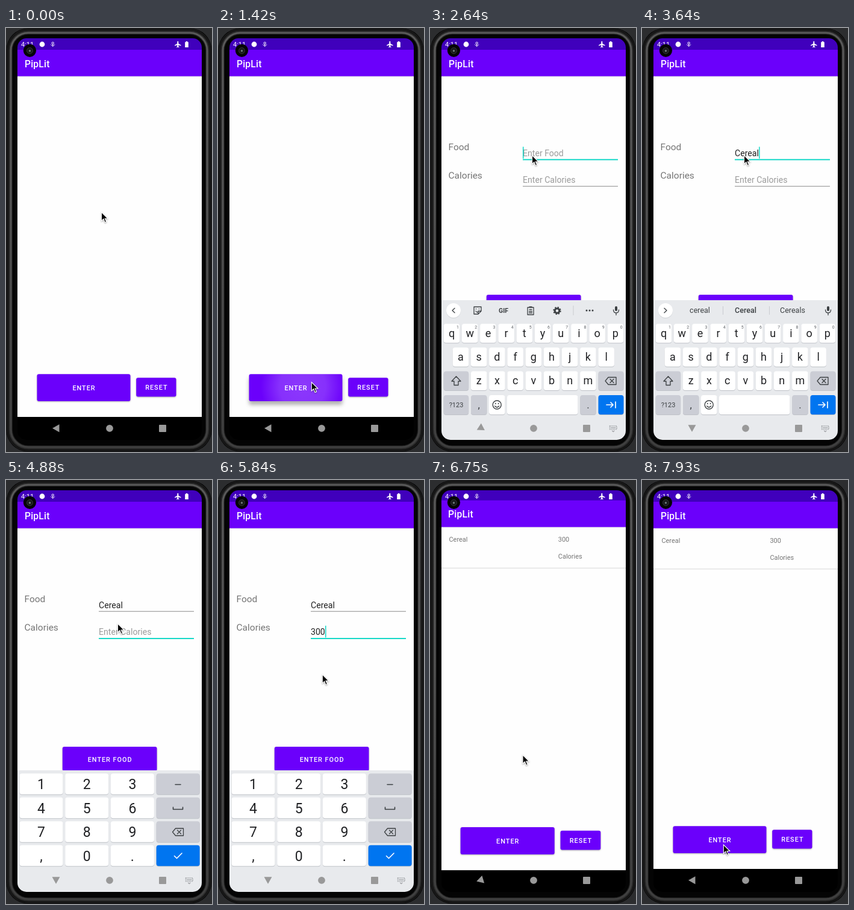
Animation, 342 px wide and 701 px high, one loop 7.99 s. Source, as an HTML page:

```html
<!DOCTYPE html>
<html lang="en">
<head>
<meta charset="utf-8">
<title>Food log demo</title>
<style>
html, body { margin: 0; width: 100%; height: 100%; overflow: hidden; background: #2c2d2f; }
svg { display: block; width: 342px; height: 701px; font-family: Roboto, sans-serif; }
.med { font-weight: 500; }
.btn { filter: drop-shadow(0 1px 1px rgba(0,0,0,.3)); }
</style>
</head>
<body>
<svg id="stage" viewBox="0 0 342 701" xmlns="http://www.w3.org/2000/svg"></svg>
<script>
const LOOP = 7990;
const PURPLE = '#6b00fb', DARK = '#4000bc', TEAL = '#00d5c3', GREY = '#757575', INK = '#3c4043';
const OPEN = 1540, CLOSE = 6550, WINDOW_MS = 400;

const rect = (x, y, w, h, fill, rx = 0, more = '') =>
  `<rect x="${x}" y="${y}" width="${w}" height="${h}" rx="${rx}" fill="${fill}" ${more}/>`;
const text = (x, y, size, fill, str, more = '') =>
  `<text x="${x}" y="${y}" font-size="${size}" fill="${fill}" ${more}>${str}</text>`;
const mid = (x, y, size, fill, str, more = '') =>
  text(x, y, size, fill, str, 'text-anchor="middle" ' + more);
const line = (d, color = INK, width = 1.3) =>
  `<path d="${d}" fill="none" stroke="${color}" stroke-width="${width}" stroke-linecap="round" stroke-linejoin="round"/>`;
const shape = (d, fill) => `<path d="${d}" fill="${fill}"/>`;
const dot = (x, y, r, fill, more = '') => `<circle cx="${x}" cy="${y}" r="${r}" fill="${fill}" ${more}/>`;

function button(id, x, y, w, h, label, baseline) {
  return `<g class="btn" id="${id}">${rect(x, y, w, h, PURPLE, 3)}</g>
    <clipPath id="${id}Clip">${rect(x, y, w, h, '#000', 3)}</clipPath>
    <g clip-path="url(#${id}Clip)">${dot(0, 0, 0, 'url(#ripple)', `id="${id}Wave"`)}</g>
    ${mid(x + w / 2 + .5, baseline, 10.9, '#fff', label, 'class="med" letter-spacing=".97"')}`;
}

function windowBase() {
  return rect(19, 17, 306, 664, '#000') + rect(19, 36, 306, 607, '#fefefe') +
    rect(19, 79, 306, 2, '#e9e6ee') + rect(19, 17, 306, 20, DARK) + rect(19, 36, 306, 43.7, PURPLE) +
    text(31, 64.5, 15.6, '#fff', 'PipLit', 'class="med" letter-spacing=".2"');
}

function mainWindow() {
  return windowBase() + `<g id="entry">
    ${text(32.5, 104, 10.9, GREY, 'Cereal')}${text(212.5, 104, 10.9, GREY, '300')}
    ${text(212.5, 131.5, 10.9, GREY, 'Calories')}${rect(19, 146.5, 306, 1.2, '#dfdfdf')}</g>` +
    button('enter', 51.5, 572.3, 155, 44.7, 'ENTER', 599) +
    button('reset', 216.2, 578.2, 66.3, 31.3, 'RESET', 598.3);
}

function field(id, y) {
  return text(154, y, 14.1, '#9b9b9b', '', `id="${id}"`) +
    rect(154, y + 5, 158, 1, '#8b8b8b', 0, `id="${id}Line"`) +
    rect(154, y - 15.3, 1.4, 19.5, TEAL, 0, `id="${id}Caret"`);
}

function formWindow() {
  return windowBase() + text(30.5, 202.3, 15.5, GREY, 'Food') + text(30.5, 248.8, 15.5, GREY, 'Calories') +
    field('food', 211.7) + field('cal', 256.2) +
    button('save', 93.8, 441, 156.7, 40, 'ENTER FOOD', 465.5);
}

const key = (x, y, w, h, fill = '#fff') =>
  rect(x, y + 1, w, h, '#bfc2c8', 4) + rect(x, y, w, h, fill, 4);
const erase = (x, y) =>
  line(`M${x - 9} ${y}l5-6h13v12h-13zM${x - 1} ${y - 3}l6 6m0-6l-6 6`);

function letterKeys() {
  const grey = '#cbcdd5';
  let out = rect(19, 450, 306, 231, '#e8eaed');
  const row = (chars, x0, y, base, digits) => [...chars].forEach((c, i) => {
    const x = x0 + 30.2 * i;
    out += key(x - 13.3, y, 26.6, 31.5) + mid(x, base, 18, '#202124', c);
    if (digits) out += mid(x + 10, 497.3, 7, '#5f6368', (i + 1) % 10);
  });
  row('qwertyuiop', 36, 489, 510.5, true);
  row('asdfghjkl', 51, 528.3, 549.5);
  row('zxcvbnm', 81.2, 567.6, 588.7);
  out += key(22.7, 567.6, 41.5, 31.5, grey) + line('M43.5 576l-7.5 8h4v6.5h7v-6.5h4z') +
    key(279.5, 567.6, 42, 31.5, grey) + erase(300, 583.5) +
    key(22.7, 607, 41.5, 32, grey) + mid(43.5, 627, 11, INK, '?123') +
    key(68, 607, 26.5, 32, grey) + mid(81.2, 629, 17, INK, ',') +
    key(98, 607, 26.5, 32) + dot(111.2, 623, 7, 'none', `stroke="${INK}" stroke-width="1.4"`) +
    dot(108.8, 621, 1, INK) + dot(113.6, 621, 1, INK) + line('M107.7 625q3.5 4 7 0') +
    key(128, 607, 117.5, 32) +
    key(249.3, 607, 26.5, 32, grey) + mid(262.5, 629, 17, INK, '.') +
    key(279.5, 607, 42, 32, '#0075f0') + line('M293 623h11m-4-4l4 4l-4 4M308 618v10', '#fff', 1.7);
  out += dot(39, 468, 12, '#cfd2d6') + dot(39, 467, 12, '#fff') +
    `<g id="fold">${line('M41 463.2l-4 3.8l4 3.8')}</g>`;
  out += `<g id="tools">
    ${line('M73 461h12v7l-5 5h-7zM80 473v-5h5M76 468q2 3 4 1')}${dot(76.5, 464.5, .8, INK)}${dot(81.5, 464.5, .8, INK)}
    ${mid(122, 471, 10.5, INK, 'GIF', 'font-weight="700"')}
    ${line('M162 462h10v12h-10zM165 465.5h4M164.5 468.5h5M164.5 471h5M165 461h4')}
    ${dot(211, 467.5, 3.8, 'none', `stroke="${INK}" stroke-width="3"`)}
    ${dot(211, 467.5, 5.8, 'none', `stroke="${INK}" stroke-width="1.8" stroke-dasharray="2.3 2.255"`)}
    ${rect(237.5, 459, 1, 16, '#c9cbd0')}
    ${[260, 265, 270].map(x => dot(x, 467, 1.5, INK)).join('')}</g>
    <g id="hints">${[96, 172, 250].map((x, i) =>
      mid(x, 471, 12.5, INK, '', i === 1 ? 'class="med"' : '')).join('')}
    ${rect(134, 460, 1, 14, '#c9cbd0')}${rect(211, 460, 1, 14, '#c9cbd0')}</g>`;
  return out + rect(307, 460, 4, 8, INK, 2) + line('M304.5 466q0 5 4.5 5t4.5-5M309 471v3.5');
}

function numberKeys() {
  let out = rect(19, 480, 306, 201, '#e8eaed');
  const labels = ['1', '2', '3', '4', '5', '6', '7', '8', '9', ',', '0', '.'];
  for (let r = 0; r < 4; r++) {
    const y = 485.3 + 39.5 * r;
    for (let c = 0; c < 3; c++) {
      const x = 22.5 + 75.7 * c;
      out += key(x, y, 72, 34.5) + mid(x + 36, y + 26, 23, '#202124', labels[r * 3 + c]);
    }
    out += key(249.6, y, 72, 34.5, r < 3 ? '#cbcdd5' : '#0075f0');
  }
  return out + line('M281 503.5h9', INK, 1.5) + line('M277.5 541v3.5h16v-3.5', INK, 1.6) +
    erase(285.5, 582) + line('M279.5 621.5l4 4l8.5-8.5', '#fff', 1.6);
}

// Dark body with a soft metal band between its rim and the glass.
function phone() {
  const ring = (i, color, width) =>
    rect(i, i, 342 - 2 * i, 701 - 2 * i, 'none', 37 - i, `stroke="${color}" stroke-width="${width}"`);
  return rect(0, 0, 342, 701, '#2c2d2f') + rect(.5, .5, 341, 700, '#040404', 36) +
    ring(2, '#1d1d1d', 1.5) + ring(7, '#191919', 8) + ring(7.5, '#303030', 5) + ring(8, 'url(#metal)', 2.5);
}

const statusIcons = () =>
  text(25, 31, 10.9, '#fff', '4:11') + dot(60, 27, 4.4, '#fff') +
  dot(77.7, 25, 1.7, 'none', 'stroke="#fff"') + line('M74.7 27.5l3 3l3-3M77.7 26.5v3', '#fff', 1) +
  shape('M284.3 22.5q1-1.5 2 0v3.2l4.2 2.6v1.2l-4.2-1.3v2.3l1.2 1v.8l-2.2-.6l-2.2.6v-.8l1.2-1v-2.3l-4.2 1.3v-1.2l4.2-2.6z', '#fff') +
  shape('M297.2 23.3h1.5v-1.2h2.6v1.2h1.5v8.7h-5.6z', '#fff');

const navIcons = () =>
  `<g id="back">${shape('M-6 0L5.5-6.5V6.5z', '#999')}</g>` + dot(172, 661.8, 5.9, '#999') +
  rect(254, 656, 12, 12, '#999', 1) +
  `<g id="kbIcon">${rect(298.5, 658, 11.5, 5.5, 'none', 0, 'stroke="#a0a2a6" stroke-width="1.5" stroke-dasharray="1.5 1"')}
   ${line('M300.5 660.8h7.5M302.5 666l1.7 1.5l1.7-1.5', '#a0a2a6', 1.2)}</g>`;

const stage = document.getElementById('stage');
stage.innerHTML = `<defs>
  <clipPath id="screen">${rect(19, 17, 306, 664, '#000', 15)}</clipPath>
  <radialGradient id="ripple"><stop offset="0" stop-color="#fff" stop-opacity=".22"/>
    <stop offset=".55" stop-color="#fff" stop-opacity=".19"/><stop offset="1" stop-color="#fff" stop-opacity="0"/></radialGradient>
  <linearGradient id="metal" x2="0" y2="1"><stop stop-color="#5c5c5c"/><stop offset=".4" stop-color="#585858"/>
    <stop offset="1" stop-color="#404040"/></linearGradient></defs>
  ${phone()}
  <g clip-path="url(#screen)"><g id="main">${mainWindow()}</g><g id="form">${formWindow()}</g>
    <g id="board"><g id="letters">${letterKeys()}</g><g id="numbers">${numberKeys()}</g></g>
    ${navIcons()}${statusIcons()}</g>
  ${dot(39.5, 37.3, 10.6, '#050505')}${dot(39.5, 37.5, 5, '#181a1b', 'stroke="#333537"')}${dot(39.5, 37.7, 1.7, '#6e777c')}
  <g id="pointer"><path d="M0 0V14.5L3.4 11.3L5.8 17L8.2 16L5.8 10.5H10.5Z" fill="#000" stroke="#fff" stroke-width="1.1"
    style="filter:drop-shadow(0 1px 1px rgba(0,0,0,.35))"/></g>`;

const $ = {};
stage.querySelectorAll('[id]').forEach(node => { $[node.id] = node; });
const hints = [...$.hints.querySelectorAll('text')];

const clamp = v => Math.max(0, Math.min(1, v));
const span = (t, from, to) => clamp((t - from) / (to - from));
const smooth = v => v * v * (3 - 2 * v);
const lerp = (a, b, v) => a + (b - a) * v;
const show = (node, on) => node.setAttribute('display', on ? 'inline' : 'none');
const set = (node, attrs) => { for (const k in attrs) node.setAttribute(k, attrs[k]); };

const bez = (a, b, c, d, u) => {
  const v = 1 - u;
  return v * v * v * a + 3 * v * v * u * b + 3 * v * u * u * c + u * u * u * d;
};
// Two joined curves: a quick start with a long, slow end.
function windowEase(x) {
  const [xs, ys] = x < 1 / 6
    ? [[0, .05, .1333, .1667], [0, 0, .06, .4]]
    : [[.1667, .2083, .25, 1], [.4, .82, 1, 1]];
  let lo = 0, hi = 1;
  for (let i = 0; i < 20; i++) {
    const m = (lo + hi) / 2;
    if (bez(...xs, m) < x) lo = m; else hi = m;
  }
  return bez(...ys, lo);
}

const path = [
  [600, 158.5, 304.5], [1100, 155.3, 585.5], [1580, 155.3, 585.5], [1880, 134, 357], [2110, 133, 300],
  [2170, 133, 300], [2420, 169.5, 210.5], [3810, 169.5, 210.5], [4110, 185.5, 237.5],
  [5650, 185.5, 237.5], [6100, 154, 454.5], [7620, 154, 454.5], [7920, 135.3, 603]
];
function pointerAt(t) {
  if (t <= path[0][0]) return path[0].slice(1);
  for (let i = 1; i < path.length; i++) {
    const [t0, x0, y0] = path[i - 1], [t1, x1, y1] = path[i];
    if (t < t1) {
      const v = smooth(span(t, t0, t1));
      return [lerp(x0, x1, v), lerp(y0, y1, v)];
    }
  }
  return path[path.length - 1].slice(1);
}

const foodTimes = [2990, 3110, 3230, 3350, 3470, 3580], calTimes = [5000, 5240, 5360];
const guesses = ['Can|C|Call', 'CEO|Ce|Certain', 'Century|Cer|Certain', 'Cereal|Cere|Ceremony',
  'Cereal|Cerea|Cereals', 'cereal|Cereal|Cereals'];
const typed = (times, t) => times.filter(at => at <= t).length;

function drawField(name, hint, word, times, focus, blur, t) {
  const n = typed(times, t), focused = t >= focus && t < blur;
  const node = $[name];
  node.textContent = n ? word.slice(0, n) : hint;
  node.setAttribute('fill', n ? '#212121' : '#9b9b9b');
  set($[name + 'Line'], { fill: focused ? TEAL : '#8b8b8b', height: focused ? 1.8 : 1 });
  const since = t - (n ? times[n - 1] : focus);
  $[name + 'Caret'].setAttribute('x', n ? 154.3 + node.getComputedTextLength() : 154);
  show($[name + 'Caret'], focused && since % 1000 < 500);
}

function press(name, t, down, up, from, to) {
  const age = t - down, on = age >= 0 && t < up + 250;
  const v = clamp(age / 225);
  set($[name + 'Wave'], {
    cx: lerp(from[0], to[0], v), cy: lerp(from[1], to[1], v),
    r: on ? 24 + .5 * Math.min(age, 260) : 0, opacity: 1 - span(t, up, up + 250)
  });
  const lift = on ? span(t, down, down + 90) * (1 - span(t, up, up + 150)) : 0;
  $[name].style.filter = `drop-shadow(0 ${1 + 5 * lift}px ${1 + 2 * lift}px rgba(0,0,0,.3))`;
}

const zoom = (node, s) =>
  node.setAttribute('transform', `translate(172 349) scale(${s}) translate(-172 -349)`);

function draw(t) {
  const closing = t >= CLOSE;
  const p = windowEase(clamp((t - (closing ? CLOSE : OPEN)) / WINDOW_MS));
  const fade = span(t, (closing ? CLOSE : OPEN) + 35, (closing ? CLOSE : OPEN) + 85);
  zoom($.main, closing ? 1.15 - .15 * p : 1 + .15 * p);
  zoom($.form, closing ? 1 - .15 * p : .85 + .15 * p);
  $.form.setAttribute('opacity', closing ? 1 - fade : fade);
  show($.form, t >= OPEN && t < CLOSE + 85);
  show($.main, t < OPEN + WINDOW_MS || closing);
  show($.entry, t > 5000);

  press('enter', t, 1330, 1500, [148, 592], [129, 594]);
  press('save', t, 6290, 6520, [154, 456], [172, 461]);
  drawField('food', 'Enter Food', 'Cereal', foodTimes, 2540, 4320, t);
  drawField('cal', 'Enter Calories', '300', calTimes, 4380, LOOP, t);

  const rise = 1 - Math.pow(1 - span(t, 2500, 2640), 2);
  const fall = smooth(span(t, 6560, 6730));
  const numeric = t >= 4370;
  $.board.setAttribute('transform', `translate(0 ${231 * (1 - rise + fall)})`);
  show($.board, t > 2500 && t < 6730);
  show($.letters, !numeric);
  show($.numbers, numeric);
  const turn = smooth(span(t, 2560, 2780)) - smooth(span(t, 6570, 6820));
  $.back.setAttribute('transform', `translate(83 661.8) rotate(${-90 * turn})`);
  show($.kbIcon, t >= 2600 && t < 6600);

  const n = typed(foodTimes, t - 50);
  show($.tools, n === 0);
  show($.hints, n > 0);
  $.fold.setAttribute('transform', n ? 'translate(78 0) scale(-1 1)' : '');
  if (n) guesses[n - 1].split('|').forEach((word, i) => { hints[i].textContent = word; });

  $.pointer.setAttribute('transform', `translate(${pointerAt(t)})`);
}

const start = performance.now();
function tick(now) {
  draw(Math.max(0, now - start) % LOOP);
  requestAnimationFrame(tick);
}
draw(0);
requestAnimationFrame(tick);
</script>
</body>
</html>
```
